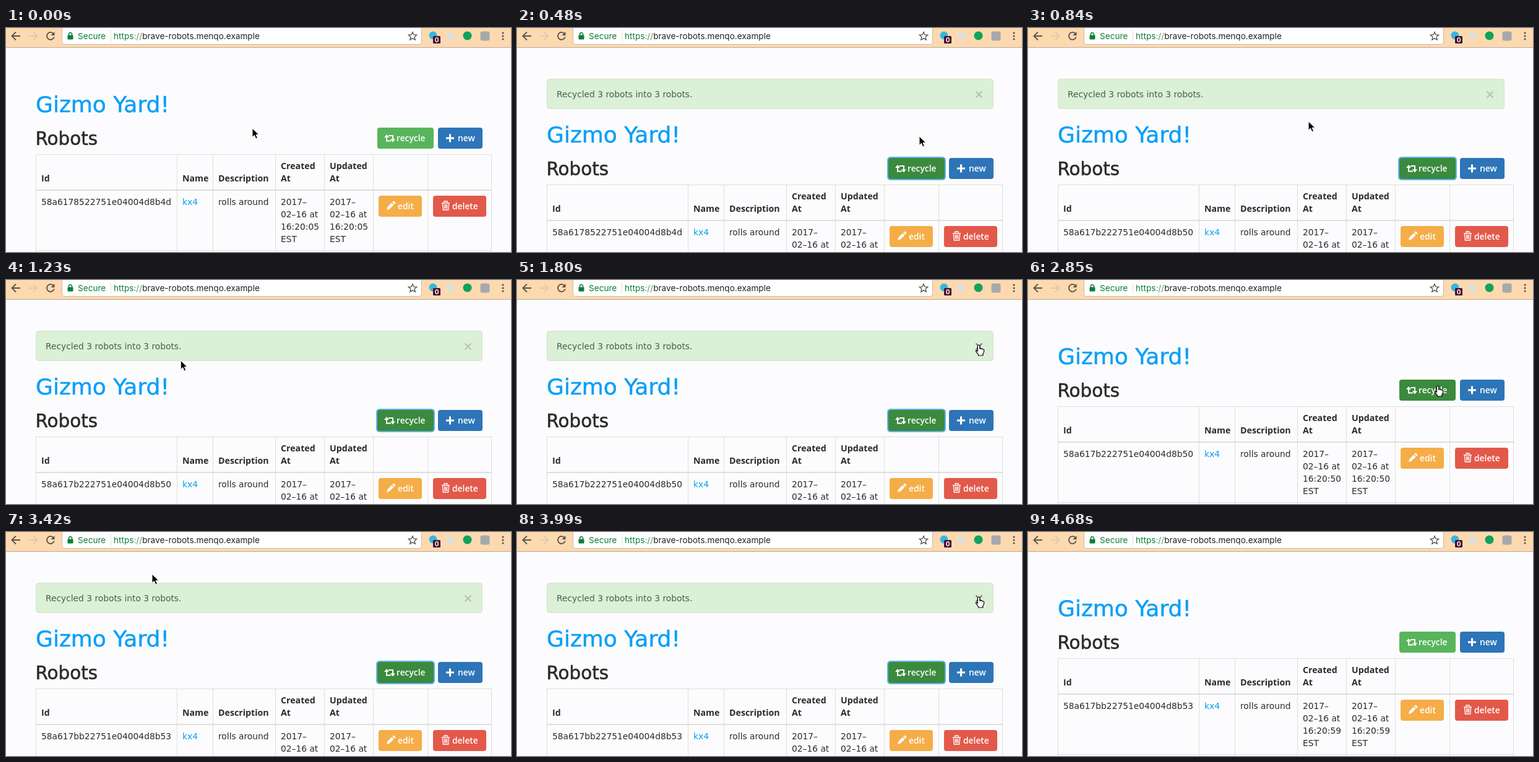
An HTML page that plays this animation: 816 px wide and 362 px high, repeating every 4.71 s.

```html
<!DOCTYPE html>
<html lang="en">
<head>
<meta charset="utf-8">
<title>Robots</title>
<style>
  html, body { margin: 0; width: 100%; height: 100%; overflow: hidden; background: #fcfcfe; }
  svg { display: block; width: 816px; height: 362px; }
  text { font: 13.8px "DejaVu Sans", sans-serif; fill: #2b2b2b; white-space: pre; }
  .bar { font: 13.6px Inter, sans-serif; fill: #222; }
  .secure { fill: #0b7f36; }
  .th { font: 700 14.2px "Open Sans", sans-serif; }
  .btn text { font: 600 13.8px "Open Sans", sans-serif; fill: #fff; }
  .link { fill: #0a9ff0; }
  .h1 { font-size: 36px; fill: #0a9ff6; stroke: #0a9ff6; stroke-width: .5; }
  .h2 { font-size: 29.4px; stroke: #2b2b2b; stroke-width: .6; }
  .line { fill: none; stroke: #dededa; }
  .icon { fill: none; stroke: #56524e; stroke-width: 1.8; }
  .glyph { fill: none; stroke: #fff; stroke-width: 2; }
</style>
</head>
<body>
<svg viewBox="0 0 816 362">
  <rect width="816" height="362" fill="#fcfcfe"/>

  <g id="alert">
    <rect x="48.5" y="82.5" width="721" height="48" rx="4" fill="#dcefd7" stroke="#d3e6c6"/>
    <text x="64" y="112" style="fill:#3d6643">Recycled 3 robots into 3 robots.</text>
    <path id="close" d="M741.5 102.5l10 10m0-10l-10 10" fill="none" stroke-width="1.8"/>
  </g>

  <g id="page">
    <text class="h1" x="48" y="136">Gizmo Yard!</text>
    <text class="h2" x="47.5" y="189">Robots</text>
    <g class="btn">
      <rect id="halo" x="598" y="159" width="95" height="38" rx="5.5" fill="#62b5ee"/>
      <rect id="recycle" x="600" y="161" width="91" height="34" rx="4"/>
      <path class="glyph" d="M615 176v6.5h7M618 174h7v6"/>
      <path d="M611 177l4-5 4 5zM621 179.5l4 5 4-5z" fill="#fff"/>
      <text x="631" y="183">recycle</text>
      <rect x="698" y="161" width="72" height="34" rx="4" fill="#2d75b8"/>
      <path class="glyph" style="stroke-width:3" d="M711 178h13M717.5 171.5v13"/>
      <text x="730" y="183">new</text>
    </g>
    <g id="table"></g>
  </g>

  <g id="toolbar">
    <rect width="816" height="31" fill="#fdd9b0"/>
    <rect y="31" width="816" height="1" fill="#b9aaa0"/>
    <rect x="90.5" y="-5.5" width="581" height="32" rx="4" fill="#fff" stroke="#d3b899"/>
    <path class="icon" d="M23 13H10m6-6.5L9.5 13l6.5 6.5"/>
    <path class="icon" style="stroke:#e4c9a6" d="M37 13h13m-6-6.5l6.5 6.5-6.5 6.5"/>
    <path class="icon" d="M77 9.5a6 6 0 1 0 .8 5"/>
    <path d="M78.5 6v6h-6z" fill="#56524e"/>
    <rect x="99.5" y="11.5" width="9" height="7" rx="1" fill="#0b7f36"/>
    <path d="M101.5 12V10a2.5 2.5 0 0 1 5 0v2" fill="none" stroke="#0b7f36" stroke-width="1.5"/>
    <text class="bar secure" x="116" y="18">Secure</text>
    <path d="M169.5 4v18" stroke="#e0e0e0"/>
    <text class="bar" x="174" y="18"><tspan class="secure">https</tspan><tspan fill="#5f9471">://</tspan>brave-robots.menqo.example</text>
    <path d="M657 6.5l1.9 4.4 4.8.4-3.6 3.1 1.100 4.700-4.200-2.500-4.200 2.500 1.100-4.700-3.600-3.100 4.800-.4z" fill="none" stroke="#56524e" stroke-width="1.3"/>
    <circle cx="690" cy="12" r="6.5" fill="#35b7e0"/>
    <rect x="690" y="13" width="12" height="12" rx="1.5" fill="#481030"/>
    <text x="696" y="22.5" text-anchor="middle" style="font:700 10px Inter,sans-serif;fill:#fff">0</text>
    <circle cx="718" cy="13" r="7" fill="#e2dfd6"/>
    <circle cx="745.5" cy="12.5" r="7" fill="#10a25d"/>
    <rect x="766.5" y="5.5" width="15" height="15" rx="3" fill="#a5a9ac"/>
    <g fill="#56524e"><circle cx="803" cy="8" r="1.6"/><circle cx="803" cy="13" r="1.6"/><circle cx="803" cy="18" r="1.6"/></g>
  </g>

  <g id="cursor">
    <path id="arrow" d="M0 0v14.5l3.4-3.2 2.4 5.6 2.6-1.1-2.400-5.400h4.600z" fill="#000" stroke="#fff"/>
    <path id="hand" d="M-1.7 1.2Q0-1.2 1.7 1.2V6Q3.3 4.9 4.3 6.3 6 5.5 6.8 7.1 8.7 6.6 8.7 9 8.7 12.5 6.8 14.5V17H-.5V15.5Q-2.5 13-4.6 9.8-4.3 7.900-1.7 10z" fill="#fff" stroke="#000" stroke-width="1.2"/>
  </g>
</svg>
<script>
const LOOP = 4710, SHIFT = 49;
const $ = id => document.getElementById(id);
const svgText = (x, y, s, cls = '', id = '') =>
  `<text x="${x}" y="${y}" class="${cls}"${id && ` id="${id}"`}>${s}</text>`;
const lines = (x, y, list, cls) =>
  list.map((s, i) => svgText(x, y + i * 20, s, cls)).join('');
const button = (x, w, color, label, labelX, icon) =>
  `<g class="btn"><rect x="${x}" y="271" width="${w}" height="34" rx="4" fill="${color}"/>${icon}` +
  svgText(labelX, 293, label) + '</g>';

const pencil = '<path fill="#fff" d="M615 294l1.2-4.5 7-7 3.3 3.3-7 7zM624.2 281.5l1.5-1.5q.7-.6 1.4 0l2 2q.6.7 0 1.4l-1.5 1.5z"/>';
const trash = '<path class="glyph" style="stroke-width:1.3" d="M704 283h13M708 282v-2h5v2M705.5 284l.8 10h8.4l.8-10M708.5 285v7M710.5 285v7M712.5 285v7"/>';
const stamp = x => lines(x, 286, ['2017–', '02–16 at']) +
  svgText(x, 326, '', 'clock') + svgText(x, 346, 'EST');

$('table').innerHTML =
  '<path class="line" d="M48 204.5H785M48 359.5H785' +
  [48, 276, 334, 435, 514, 593, 681, 784].map(x => `M${x + .5} 204V420`).join('') + '"/>' +
  '<path class="line" stroke-width="2" d="M48 262H785"/>' +
  svgText(57, 248, 'Id', 'th') + svgText(285, 248, 'Name', 'th') +
  svgText(343, 248, 'Description', 'th') +
  lines(444, 228, ['Created', 'At'], 'th') + lines(523, 228, ['Updated', 'At'], 'th') +
  svgText(57, 286, '', '', 'robotId') + svgText(285, 286, 'kx4', 'link') +
  svgText(343, 286, 'rolls around') + stamp(444) + stamp(523) +
  button(602, 70, '#f5ad47', 'edit', 633, pencil) +
  button(690, 86, '#e2594a', 'delete', 721, trash);

// Pointer stops: time, x, y
const path = [
  [0, 398, 162], [300, 650, 175], [510, 650, 175], [1140, 284, 130], [1260, 282, 130],
  [1740, 746, 105], [1980, 746, 105], [2430, 662, 171], [3060, 662, 171],
  [3390, 236, 68], [3480, 236, 68], [3930, 746, 105], [4170, 746, 105], [4560, 590, -25], [LOOP, 590, -25]
];
// Table contents: time, id, clock
const records = [
  [0, '58a6178522751e04004d8b4d', '16:20:05'],
  [630, '58a617b222751e04004d8b50', '16:20:50'],
  [3300, '58a617bb22751e04004d8b53', '16:20:59']
];
const alerts = [[420, 1920], [3060, 4110]];

function pointer(t) {
  const i = path.findIndex(p => p[0] > t);
  const [t0, x0, y0] = path[i - 1], [t1, x1, y1] = path[i];
  const u = (t - t0) / (t1 - t0), e = u * u * (3 - 2 * u);
  return [x0 + (x1 - x0) * e, y0 + (y1 - y0) * e];
}
const inside = (x, y, l, t, r, b) => x >= l && x <= r && y >= t && y <= b;
const show = (el, on) => el.setAttribute('visibility', on ? 'visible' : 'hidden');
const clocks = document.querySelectorAll('.clock');

function draw(t) {
  const open = alerts.some(([a, b]) => t >= a && t < b);
  const dy = open ? SHIFT : 0;
  const [x, y] = pointer(t);
  const overRecycle = inside(x, y, 600, 161 + dy, 691, 195 + dy);
  const overClose = open && inside(x, y, 738, 97, 755, 117);
  const overNew = inside(x, y, 698, 161 + dy, 770, 195 + dy);

  show($('alert'), open);
  show($('halo'), open);
  $('page').setAttribute('transform', `translate(0 ${dy})`);
  $('recycle').setAttribute('fill', open || overRecycle ? '#3b8a3e' : '#58b55b');
  $('close').setAttribute('stroke', overClose ? '#6e786c' : '#b2c2ae');

  const [, id, clock] = records.filter(r => r[0] <= t).pop();
  $('robotId').textContent = id;
  clocks.forEach(c => c.textContent = clock);

  const hand = overRecycle || overClose || overNew;
  $('cursor').setAttribute('transform', `translate(${x} ${y})`);
  show($('hand'), hand);
  show($('arrow'), !hand);
}

const start = performance.now();
function tick() {
  draw((performance.now() - start) % LOOP);
  requestAnimationFrame(tick);
}
draw(0);
requestAnimationFrame(tick);
</script>
</body>
</html>
```
